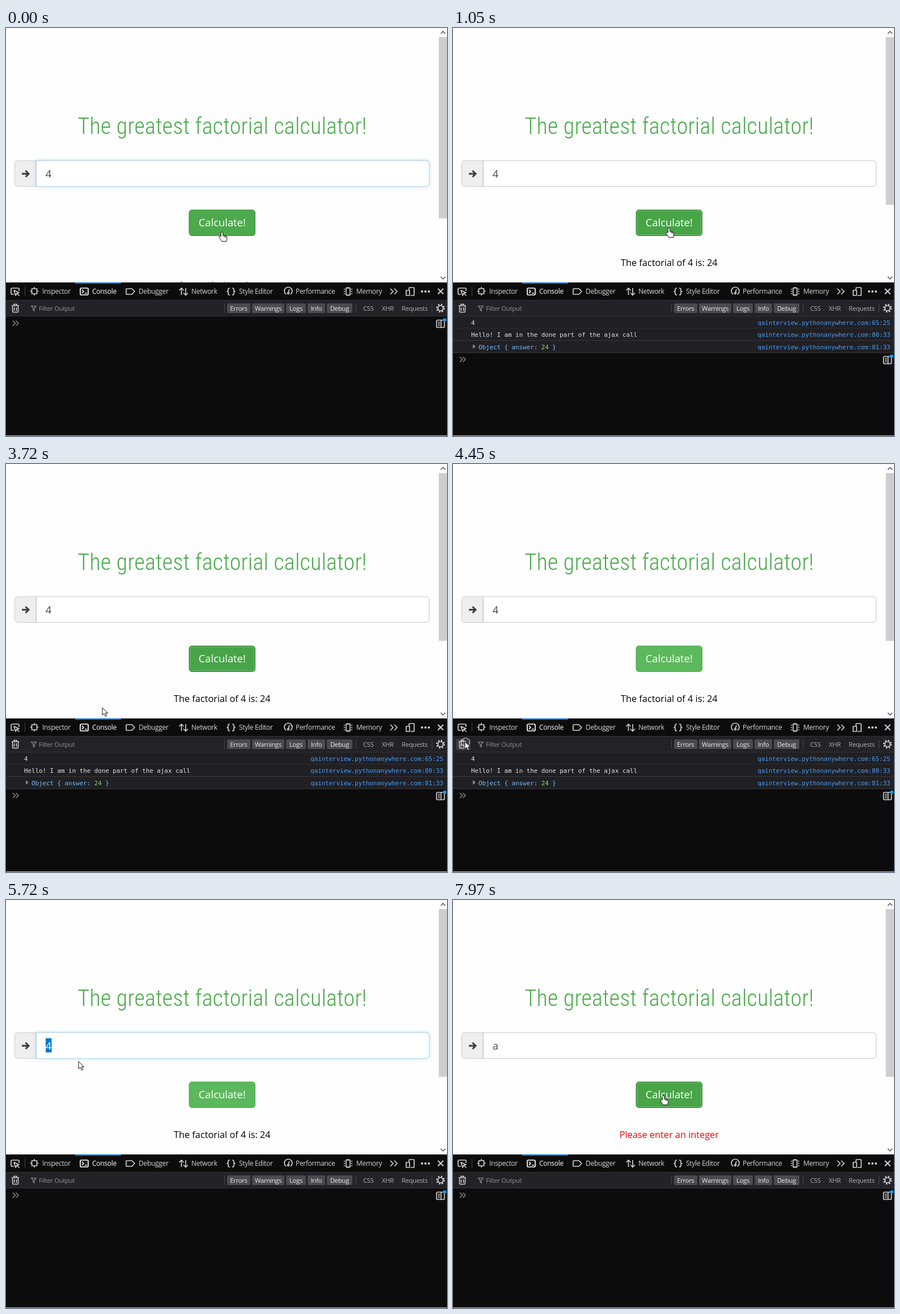
Animation, 778 px wide and 720 px high, one loop 8000 ms. Source, as an HTML page:

```html
<!DOCTYPE html>
<html lang="en">
<head>
<meta charset="utf-8">
<title>Factorial calculator</title>
<style>
html, body { margin: 0; width: 100%; height: 100%; overflow: hidden; background: #fefefe; }
svg { display: block; width: 778px; height: 720px; font-family: "Open Sans", "Noto Sans", sans-serif; }
text { white-space: pre; }
.title { font: 300 40px "Roboto Condensed", Roboto, sans-serif; font-stretch: 75%; letter-spacing: .22px; fill: #4aaa4a; }
.mid { text-anchor: middle; }
.field { font-size: 18.4px; fill: #484848; }
#glow { fill: #fff; stroke: #b4d3ec; filter: drop-shadow(0 0 3px rgba(102, 175, 233, .4)); }
.tabs { font-size: 12px; letter-spacing: -.3px; fill: #d7d7db; }
.filters { font-size: 11.3px; letter-spacing: -.3px; fill: #b1b1b3; }
.log { font: 10.82px "DejaVu Sans Mono", "Noto Sans Mono", monospace; fill: #e2e2e4; }
.link { fill: #4a9cf5; text-anchor: end; }
.icon { fill: none; stroke: #d0d0d4; stroke-width: 1.7; stroke-linejoin: round; }
#pointer > * { stroke-linejoin: round; }
</style>
</head>
<body>
<svg viewBox="0 0 778 720">
  <rect width="778" height="720" fill="#fefefe"/>

  <!-- page -->
  <text class="title mid" x="381.5" y="187">The greatest factorial calculator!</text>
  <path d="M53 234H21q-5.500 0-5.500 5.500V274q0 5.500 5.500 5.500H53z" fill="#eee" stroke="#ccc"/>
  <path d="M28 257.300H39M34.500 251.800l5.500 5.500-5.500 5.500" fill="none" stroke="#3c3c3c" stroke-width="3"/>
  <path id="box" d="M53.500 234H741q5.500 0 5.500 5.500V274q0 5.500-5.500 5.500H53.500z" fill="#fff" stroke="#c6c6c6"/>
  <path id="glow" d="M53.500 234H741q5.500 0 5.500 5.500V274q0 5.500-5.500 5.500H53.500z"/>
  <rect id="selection" x="70" y="244" width="10.500" height="25" fill="#0078d7"/>
  <text id="entry" class="field" x="69.700" y="263.700">4</text>
  <path id="caret" d="M80.500 245v24" stroke="#333"/>
  <g id="button">
    <rect x="323" y="321" width="116.500" height="45.500" rx="5"/>
    <rect id="ring" x="325" y="323" width="112.500" height="41.500" rx="3" fill="none" stroke="#6fba6f"/>
  </g>
  <text class="mid" x="381.300" y="350" font-size="18.400" fill="#fff">Calculate!</text>
  <text id="answer" class="mid" x="381.300" y="419.800" font-size="16.300"></text>
  <text id="footer" class="mid" x="381.500" y="455" font-size="10.500" fill="#5b95c7">Terms and Conditions · Privacy</text>
  <rect id="thumb" x="763.500" y="16" width="14.500" fill="#cdcdcd"/>
  <path d="M767 10l4-4 4 4M767 439l4 4 4-4" fill="none" stroke="#505050" stroke-width="1.500"/>

  <!-- developer tools -->
  <path d="M0 449H778V719.300H0z" fill="#0c0c0d"/>
  <path d="M0 480H778V509H0z" fill="#232327"/>
  <path d="M0 480.500H778M0 508.500H778" stroke="#323237"/>
  <path d="M122 450.300H203" stroke="#0a84ff" stroke-width="2"/>
  <path d="M33.500 457v16M385.500 486v17M617.500 486v17M751.500 486v17" stroke="#45454a"/>
  <g class="icon">
    <path d="M14 470H11q-2 0-2-2V461q0-2 2-2H21q2 0 2 2v3M14 463l9 4-4 1 4 4-4-4-2 4z"/>
    <path d="M45.500 460h9v9h-9zM50 457v3M50 469v3M42.500 464.500h3M54.500 464.500h3"/>
    <rect x="131" y="459" width="14" height="12" rx="2" stroke="#fff"/>
    <path d="M134 462l3 3-3 3M139 468h4" stroke="#fff"/>
    <path d="M213 460h9l5 5-5 5h-9q-1 0-1-1v-8q0-1 1-1z"/>
    <path d="M309.500 471V459M305.500 463l4-4 4 4M317 459v12M313 467.500l4 4 4-4"/>
    <path d="M395 459q-3 0-3 2v2q0 2-2 2 2 0 2 2v2q0 2 3 2M399 459q3 0 3 2v2q0 2 2 2-2 0-2 2v2q0 2-3 2"/>
    <path d="M494 470a7 7 0 1 1 8 0M498 467l2-6"/>
    <circle cx="498" cy="468" r="1.500"/>
    <path d="M600 459h7v12h-7zM596 461h2M596 465h2M596 469h2M609 461h2M609 465h2M609 469h2M602 457v2M605 457v2M602 471v2M605 471v2"/>
    <path d="M678 460l5 5-5 5M685 460l5 5-5 5"/>
    <path d="M711 462v-3q0-1 1-1h7q1 0 1 1v12q0 1-1 1h-5M706 463h6v9h-6z"/>
    <path d="M762 460l9.500 9.500M771.500 460l-9.500 9.500" stroke-width="2"/>
  </g>
  <g fill="#d0d0d4"><circle cx="734" cy="465" r="2"/><circle cx="740" cy="465" r="2"/><circle cx="746" cy="465" r="2"/></g>
  <g id="tabs" class="tabs"></g>

  <rect id="hover" x="5" y="485" width="26" height="20" rx="2" fill="#3c3c41"/>
  <g class="icon">
    <path d="M10 490h13M14 490v-2.500h5v2.500M11.500 490v10q0 1.500 1.500 1.500h7q1.500 0 1.500-1.500V490M14.500 493v6M18.500 493v6" stroke-width="1.500"/>
    <path d="M44.500 490.500h9l-3.500 4v5l-2-1.500v-3.500z" stroke="#8f8f94" stroke-width="1.200"/>
    <circle cx="766.500" cy="494.500" r="4.500"/>
    <circle cx="766.500" cy="494.500" r="6.500" stroke-width="2.500" stroke-dasharray="2.500 2.605"/>
  </g>
  <g id="filters" class="filters"><text x="58" y="499" fill="#8f8f94">Filter Output</text></g>

  <g id="log" class="log"></g>
  <g id="prompt" class="icon">
    <path d="M12 516.500l4.500 4.500-4.500 4.500M17.500 516.500l4.500 4.500-4.500 4.500" stroke="#939398" stroke-width="1.400"/>
    <rect x="759.500" y="515.500" width="14" height="13" rx="2"/>
    <path d="M767.500 515v13M762 519h3.500M762 522h3.500M762 525h3.500"/>
    <circle cx="774" cy="515" r="3" fill="#0a9cf5" stroke="none"/>
  </g>

  <g id="pointer">
    <path id="arrow" d="M0 0V13l3-2.700 2.500 5 2.200-1-2.400-4.800H9.500z" fill="#fff" stroke="#111"/>
    <path id="hand" d="M-1.700 8V1.600Q-1.700 0 0 0T1.700 1.600V6l5 1q2.300.6 2.300 3l-1 4v2.500H-.5l-1-2-3.500-5q0-2 1.800-1.700z M4 6.500v3M6.500 7v3" fill="#fff" stroke="#111"/>
    <path id="beam" d="M-3-8h2l1 1 1-1h2M0-7V7M-3 8h2l1-1 1 1h2" fill="none" stroke="#222"/>
    <circle id="click" cx="1" cy="1" r="7.500" fill="none" stroke="#ddd"/>
  </g>
</svg>
<script>
const $ = id => document.getElementById(id);
const show = (id, on) => $(id).setAttribute('visibility', on ? 'visible' : 'hidden');
const within = (v, a, b) => v >= a && v < b;

$('tabs').innerHTML = [['Inspector', 64], ['Console', 152], ['Debugger', 234], ['Network', 327],
  ['Style Editor', 411], ['Performance', 511], ['Memory', 618]]
  .map(([name, x]) => `<text x="${x}" y="469"${name == 'Console' ? ' fill="#fff"' : ''}>${name}</text>`).join('');

$('filters').innerHTML += [['Errors', 390, 41], ['Warnings', 434, 57], ['Logs', 494, 35], ['Info', 532, 31], ['Debug', 566, 45]]
  .map(([name, x, w]) => `<rect x="${x}" y="486" width="${w}" height="17" rx="2" fill="#4a4a4f"/>
    <text class="mid" x="${x + w / 2}" y="499" fill="#ededf0">${name}</text>`).join('')
  + [['CSS', 630], ['XHR', 663], ['Requests', 698]].map(([name, x]) => `<text x="${x}" y="499">${name}</text>`).join('');

const blue = s => `<tspan fill="#75bfff">${s}</tspan>`;
const green = s => `<tspan fill="#86de74">${s}</tspan>`;
const object = blue('Object { answer: ') + green('24') + blue(' }');
$('log').innerHTML = [['4', '65:25'], ['Hello! I am in the done part of the ajax call', '80:33'], [object, '81:33']]
  .map(([text, line], i) => {
    const y = 509 + i * 21.5;
    return `<g><rect y="${y}" width="778" height="21.500" fill="#202024"/>
      <path d="M0 ${y + 21}H778" stroke="#38383d"/>
      ${i == 2 ? `<path d="M35 ${y + 6}l5 4-5 4z" fill="#87878c"/>` : ''}
      <text x="${i == 2 ? 45 : 32}" y="${y + 14.5}">${text}</text>
      <text class="link" x="771.500" y="${y + 14.5}">qainterview.pythonanywhere.com:${line}</text></g>`;
  }).join('');
const rows = [...$('log').children];

// Pointer hot spot: time, x, y
const path = [
  [0, 381, 360], [180, 381, 360], [430, 381, 353], [1999, 381, 353], [2000, 376, 356],
  [2370, 376, 356], [2550, 361, 361], [2730, 344, 348], [3169, 344, 348], [3170, 340, 348],
  [3450, 340, 348], [3720, 170, 430], [3990, 21, 489], [4179, 21, 489], [4180, 21, 490],
  [4640, 21, 490], [4910, 55, 370], [5180, 98, 260], [5270, 96, 258], [5450, 62, 258],
  [5540, 50, 258], [5720, 128, 285], [5810, 142, 296], [5900, 150, 258], [6079, 150, 258],
  [6080, 203, 257], [6170, 203, 257], [6620, 193, 400], [6710, 193, 400], [6890, 215, 405],
  [7160, 245, 387], [7430, 320, 378], [7520, 362, 348], [7610, 371, 345], [8000, 371, 345]];

function pointerAt(t) {
  const i = path.findIndex(p => p[0] > t);
  const [t0, x0, y0] = path[i - 1], [t1, x1, y1] = path[i];
  const k = (t - t0) / (t1 - t0);
  return [x0 + (x1 - x0) * k, y0 + (y1 - y0) * k];
}

function refreshTime(t) {
  const offset = t < 870 ? 70 : t < 2460 ? 20 : t < 4180 ? 30 : 50;
  return Math.max(0, Math.floor((t - offset) / 90) * 90 + offset);
}

const styles = { plain: ['#5cb85c', '#4cae4c'], hover: ['#4ca94c', '#3c8c3c'], focus: ['#47a447', '#398439'] };

function draw(t) {
  const [x, y] = pointerAt(refreshTime(t));
  const overButton = within(x, 323, 440) && within(y, 321, 367);
  const overField = within(x, 53, 747) && within(y, 234, 280);
  $('pointer').setAttribute('transform', `translate(${Math.round(x)} ${Math.round(y)})`);
  show('hand', overButton);
  show('beam', overField);
  show('arrow', !overButton && !overField);
  show('click', within(t, 4360, 4540));
  show('hover', within(t, 3990, 4730));

  const state = within(t, 180, 4360) || t >= 7790 ? 'focus' : overButton ? 'hover' : 'plain';
  $('button').setAttribute('fill', styles[state][0]);
  $('button').setAttribute('stroke', styles[state][1]);
  show('ring', state == 'focus');

  const fade = t < 5000 ? 1 - (t - 180) / 200 : t < 7790 ? (t - 5270) / 150 : 1 - (t - 7790) / 150;
  $('glow').setAttribute('opacity', Math.max(0, Math.min(1, fade)));
  const selected = within(t, 5450, 6080);
  show('selection', selected);
  show('caret', within(t, 6080, 6530) || within(t, 6980, 7430));
  $('entry').textContent = t < 6080 ? '4' : 'a';
  $('entry').style.fill = selected ? '#fff' : '';

  const invalid = t >= 7880, solved = t >= 870;
  $('answer').textContent = invalid ? 'Please enter an integer' : solved ? 'The factorial of 4 is: 24' : '';
  $('answer').setAttribute('fill', invalid ? '#f00000' : '#000');
  $('thumb').setAttribute('height', solved ? 296 : 320);
  show('footer', !solved);

  const count = within(t, 520, 1050) ? 1 : within(t, 1050, 4540) ? 3 : 0;
  rows.forEach((row, i) => row.setAttribute('visibility', i < count ? 'visible' : 'hidden'));
  $('prompt').setAttribute('transform', `translate(0 ${Math.round(count * 21.4)})`);
}

function frame(now) {
  draw(now % 8000);
  requestAnimationFrame(frame);
}
draw(0);
requestAnimationFrame(frame);
</script>
</body>
</html>
```
